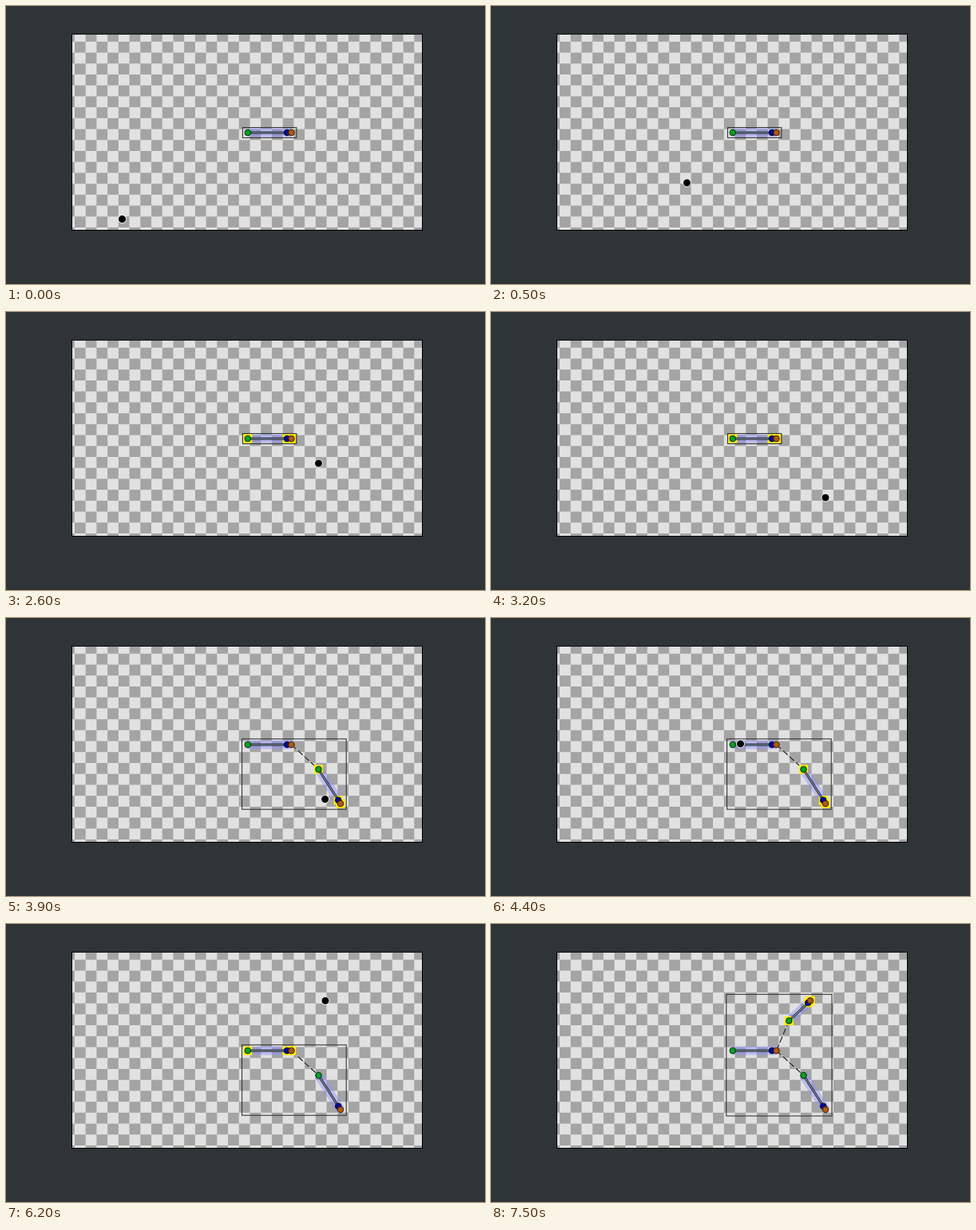
Animation, 600 px wide and 349 px high, one loop 9000 ms. Source, as an HTML page with a canvas:

```html
<!DOCTYPE html>
<html lang="en">
<head>
<meta charset="utf-8">
<title>Building a skeleton</title>
<style>
html, body { margin: 0; width: 100%; height: 100%; overflow: hidden; background: #2f3537; }
canvas { display: block; }
</style>
</head>
<body>
<canvas id="stage" width="600" height="349"></canvas>
<script>
const ctx = document.getElementById('stage').getContext('2d');
const LOOP = 9000, STEP = 100;
const BOARD = { left: 82.5, top: 35.3, width: 439, height: 246.2 };
const CELL = BOARD.width / 32;

const point = (x, y) => ({ x, y });
const mix = (a, b, u) => a + (b - a) * u;
const between = (a, b, u, v = u) => point(mix(a.x, b.x, u), mix(a.y, b.y, v));

function makeBone(born, start, tip) {
  return { born, start, tip, knuckle: between(start, tip, 0.9) };
}

const root = makeBone(0, point(302.8, 159), point(357.5, 159));
const lower = makeBone(3500, point(391.5, 190), point(419, 233));
const upper = makeBone(6300, point(373.3, 121.5), point(400, 96.3));
const bones = [root, lower, upper];

// The latest entry that has been reached is the selected bone.
const selections = [
  { at: 1900, bone: root },
  { at: lower.born, bone: lower },
  { at: 5100, bone: root },
  { at: upper.born, bone: upper }
];

// Each move continues from where the previous one ended.
const moves = [
  { from: 0, until: 0, to: point(145.5, 267.5) },
  { from: 0, until: 1100, to: point(320, 162) },
  { from: 2100, until: 2600, to: lower.start },
  { from: 2900, until: 3200, to: lower.tip },
  { from: 3800, until: 4400, to: point(312.5, 158) },
  { from: 5000, until: 5500, to: upper.start },
  { from: 5900, until: 6200, to: upper.tip },
  { from: 7300, until: 7400, to: point(548, 234) }
];
const CURSOR_GONE = 7500;

// The hand sets off sideways; the vertical motion follows with a smooth step.
function cursorAt(t) {
  const i = moves.findLastIndex(move => t >= move.from);
  const { from, until, to } = moves[i];
  const p = Math.min(1, (t - from) / (until - from));
  return between(moves[i - 1].to, to,
    Math.sin(Math.PI / 2 * p ** 1.2), p * p * (3 - 2 * p));
}

function line(a, b, width, color, dash = []) {
  ctx.setLineDash(dash);
  ctx.lineWidth = width;
  ctx.strokeStyle = color;
  ctx.beginPath();
  ctx.moveTo(a.x, a.y);
  ctx.lineTo(b.x, b.y);
  ctx.stroke();
  ctx.setLineDash([]);
}

function dot({ x, y }, radius, fill, stroke) {
  ctx.beginPath();
  ctx.arc(x, y, radius, 0, 2 * Math.PI);
  ctx.fillStyle = fill;
  ctx.fill();
  ctx.strokeStyle = stroke;
  ctx.lineWidth = 1;
  ctx.stroke();
}

function frame(left, top, width, height, color) {
  ctx.strokeStyle = color;
  ctx.lineWidth = 1;
  ctx.strokeRect(left, top, width, height);
}

function drawBoard() {
  const { left, top, width, height } = BOARD;
  ctx.fillStyle = '#2f3537';
  ctx.fillRect(0, 0, 600, 349);
  ctx.save();
  ctx.beginPath();
  ctx.rect(left, top, width, height);
  ctx.clip();
  ctx.fillStyle = '#e1e1e1';
  ctx.fillRect(left, top, width, height);
  ctx.fillStyle = '#a4a4a4';
  for (let row = -1; row < 18; row++) {
    for (let col = -1; col < 32; col++) {
      if ((row + col) % 2 === 0) {
        ctx.fillRect(86 + col * CELL, 44.8 + row * CELL, CELL, CELL);
      }
    }
  }
  ctx.restore();
  frame(left, top, width, height, '#000');
}

function drawBone({ start, knuckle, tip }, selected) {
  line(start, tip, 11, 'rgba(140,140,255,.45)');
  if (selected) {
    ctx.fillStyle = '#ffee00';
    for (const { x, y } of [start, knuckle, tip]) ctx.fillRect(x - 5.6, y - 5.6, 11.2, 11.2);
  }
  line(start, tip, 3, '#1c2430');
  line(start, tip, 1.2, '#8698a0');
  dot(knuckle, 3.8, '#000a90', '#00063c');
  dot(start, 3.8, '#08a024', '#042c0a');
  dot(tip, 3.8, '#b05a10', '#3a1c04');
}

function drawBounds(shown) {
  const joints = shown.flatMap(bone => [bone.start, bone.tip]);
  const xs = joints.map(p => p.x), ys = joints.map(p => p.y);
  const pad = 5.6 + 0.8 * shown.length;
  const left = Math.min(...xs) - pad, top = Math.min(...ys) - pad;
  frame(left, top, Math.max(...xs) + pad - left, Math.max(...ys) + pad - top, '#2a2a2a');
}

function draw(t) {
  const shown = bones.filter(bone => t >= bone.born);
  const selected = selections.findLast(s => t >= s.at)?.bone;
  drawBoard();
  for (const bone of shown.slice(1)) {
    line(root.tip, bone.start, 1.2, '#ccc');
    line(root.tip, bone.start, 1.2, '#222', [8, 3]);
  }
  shown.forEach(bone => drawBone(bone, bone === selected));
  drawBounds(shown);
  if (t < CURSOR_GONE) dot(cursorAt(t), 5, '#000', '#fff');
}

function tick(now) {
  draw(Math.floor(now % LOOP / STEP) * STEP);
  requestAnimationFrame(tick);
}
requestAnimationFrame(tick);
</script>
</body>
</html>
```
